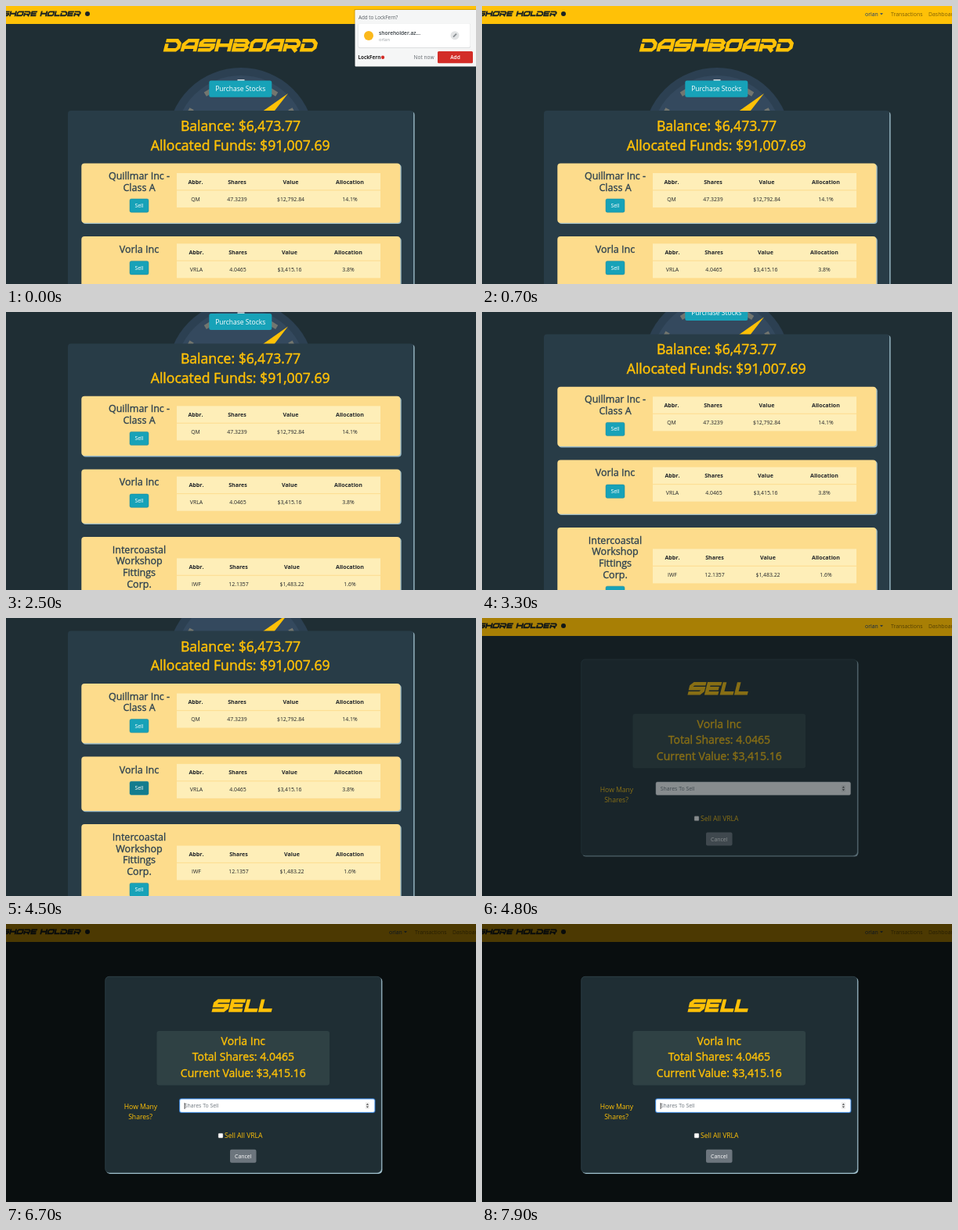
An HTML page for the animation above (8000 ms loop, 600 by 356 pixels).

```html
<!DOCTYPE html>
<html lang="en">
<head>
<meta charset="utf-8">
<title>Stock dashboard</title>
<style>
html, body { margin: 0; width: 100%; height: 100%; overflow: hidden; background: #1f2e34; }
svg { display: block; width: 100%; height: 100%; font-family: "Open Sans", "Noto Sans", sans-serif; }
</style>
</head>
<body>
<svg id="stage" viewBox="0 0 600 356" xmlns="http://www.w3.org/2000/svg"></svg>
<script>
const GOLD = '#ffc107', TEAL = '#17a2b8', PAGE = '#1f2e34', SLATE = '#2c4150', EDGE = '#9dbcc8';
const LOOP = 8000, STEP = 100;

const rect = (x, y, w, h, fill, r = 0, extra = '') =>
  `<rect x="${x}" y="${y}" width="${w}" height="${h}" rx="${r}" fill="${fill}" ${extra}/>`;
const text = (x, y, size, fill, str, { weight = 400, anchor = 'middle', id = '' } = {}) =>
  `<text ${id && `id="${id}"`} x="${x}" y="${y}" font-size="${size}" fill="${fill}" font-weight="${weight}" text-anchor="${anchor}">${str}</text>`;
// A thin outline gives a medium weight.
const heading = (x, y, size, fill, str) =>
  `<g stroke="${fill}" stroke-width="${size * .026}">${text(x, y, size, fill, str)}</g>`;
const raised = (x, y, w, h, fill, r, edge = EDGE) =>
  rect(x + 1.4, y + 1.4, w, h, edge, r) + rect(x, y, w, h, fill, r);

// Display lettering: centre lines on a 16 unit high cell, with the cell width.
const GLYPHS = {
  D: [20, 'M0 2H14L18 6V11L15 14H2V6'],
  A: [20, 'M2 16V7L7 2H18V16M2 10.5H18'],
  S: [20, 'M20 2H5L2 5V8H18V11L15 14H0'],
  H: [20, 'M2 0V16M18 0V16M2 8H18'],
  B: [20, 'M0 2H15L18 5L16 8H4M16 8L18 11L15 14H2V5'],
  O: [20, 'M5 2H18V11L15 14H2V5Z'],
  R: [20, 'M2 16V6M0 2H15L18 5V8L16 10H4M11 10L17 16'],
  E: [18, 'M18 2H2V14H17M2 8H16'],
  L: [16.5, 'M2 0V14H16.5']
};
function lettering(word, x, y, scale, color) {
  let pen = 0;
  const paths = [...word].map(ch => {
    const [width, d] = GLYPHS[ch] || [8, ''];
    const path = `<path transform="translate(${pen})" d="${d}"/>`;
    pen += width + 1.75;
    return path;
  }).join('');
  return `<g role="img" aria-label="${word}" transform="translate(${x} ${y}) scale(${scale}) translate(4) skewX(-14)"
    fill="none" stroke="${color}" stroke-width="4.6">${paths}</g>`;
}

const navbar = () => rect(0, 0, 600, 23, GOLD) +
  lettering('SHORE HOLDER', -5, 6.5, .415, '#1c2424') +
  '<circle cx="104" cy="10" r="3" fill="#1c2424"/>' +
  text(489, 13, 6.9, '#1c3f72', 'orlan', { anchor: 'start' }) +
  '<path d="M508 9.3h4l-2 2z" fill="#1c3f72"/>' +
  text(522, 13, 6.9, '#7d5f06', 'Transactions', { anchor: 'start' }) +
  text(570, 13, 6.9, '#7d5f06', 'Dashboard', { anchor: 'start' });

function gauge() {
  const ticks = [-62, -32, 32, 62].map(a =>
    `<rect x="-7" y="-78" width="14" height="6" fill="#73766f" transform="rotate(${a})"/>`).join('');
  return `<g transform="translate(300 173)">
    <circle r="94" fill="#2c4052"/><circle r="84" fill="#34495e"/>${ticks}
    <rect x="-4.5" y="-79" width="9" height="6" fill="#d5dadc"/>
    <path d="M60 -61L16 -30H36Z" fill="${GOLD}"/></g>`;
}

function sellButton(y, id = '') {
  return rect(158, y, 24, 17.2, TEAL, 2, `${id && `id="${id}"`} stroke="#1d8499" stroke-width=".5"`) +
    text(170, y + 11, 6.9, '#fff', 'Sell');
}

function card({ y, h, lines, first, buttonY, tableY, cols, row, id }) {
  const heads = ['Abbr.', 'Shares', 'Value', 'Allocation'];
  return raised(96.3, y, 407, h, '#fddc8c', 4) +
    lines.map((s, i) => heading(170, first + i * 14.6, 12.5, SLATE, s)).join('') +
    sellButton(buttonY, id) +
    rect(218, tableY, 260, 44, '#feeeb8') + rect(218, tableY + 21.3, 260, 1.2, '#fddf95') +
    cols.map((x, i) => text(x, tableY + 13.5, 7.1, '#212529', heads[i], { weight: 700 }) +
      text(x, tableY + 35.6, 6.9, '#212529', row[i])).join('');
}

const cards = [
  { y: 201.4, h: 76.3, lines: ['Quillmar Inc -', 'Class A'], first: 222, buttonY: 247, tableY: 214,
    cols: [242, 295, 363.5, 439], row: ['QM', '47.3239', '$12,792.84', '14.1%'] },
  { y: 295, h: 69.3, lines: ['Vorla Inc'], first: 316, buttonY: 326.7, tableY: 304.3,
    cols: [243, 296, 362, 437], row: ['VRLA', '4.0465', '$3,415.16', '3.8%'], id: 'hoverSell' },
  { y: 381.5, h: 106, lines: ['Intercoastal', 'Workshop', 'Fittings', 'Corp.'], first: 402.5, buttonY: 456.8, tableY: 409,
    cols: [243, 297, 365, 439], row: ['IWF', '12.1357', '$1,483.22', '1.6%'] }
];

const dashboard = () => `<g id="dashboard">` +
  lettering('DASHBOARD', 201, 42.3, 1, GOLD) + gauge() +
  rect(259.3, 95.5, 80, 21.2, TEAL, 2.5) + text(299.2, 109.2, 8.5, '#fff', 'Purchase Stocks') +
  raised(79, 134, 441.2, 420, '#283c47', 4) +
  heading(299.5, 160, 17.6, GOLD, 'Balance: $6,473.77') +
  heading(299.2, 184.7, 17.6, GOLD, 'Allocated Funds: $91,007.69') +
  cards.map(card).join('') + '</g>';

const start = { anchor: 'start' };
const popup = () => `<g id="popup">` +
  rect(444.5, 4, 156, 74, '#000', 1, 'opacity=".18"') + rect(445.5, 5, 155, 72.5, '#f5f6f6', 1) +
  text(450, 16.7, 6.3, '#555b60', 'Add to LockFern?', start) +
  rect(449.5, 22.5, 143.5, 31.5, '#dcdedf', 2) + rect(450, 22.5, 142.5, 30.5, '#fff', 2) +
  `<circle cx="463" cy="38" r="6" fill="#fbb91c"/>` +
  text(476, 37, 6.6, '#333a3f', 'shoreholder.az...', { anchor: 'start', weight: 600 }) +
  text(476, 44.8, 5.8, '#9a9fa3', 'orlan', start) +
  `<circle cx="573" cy="37.7" r="5.5" fill="#e2e4e5"/>
   <path d="M571 39.7L575 35.7" stroke="#8a9094" stroke-width="1.8"/>` +
  text(449.5, 67.8, 6.3, '#222', 'LockFern', { anchor: 'start', weight: 700 }) +
  `<circle cx="481" cy="65.7" r="2.2" fill="#d32d27"/>` +
  text(533.5, 67.9, 6.6, '#60666b', 'Not now', { id: 'notNow' }) +
  rect(551, 58, 45, 15.3, '#d32d27', 1.5) +
  text(573.5, 68, 6.6, '#fff', 'Add', { weight: 600 }) + '</g>';

const modal = () => `<rect id="backdrop" width="600" height="356"/><g id="modal">` +
  raised(126.5, 67, 352.5, 251.5, PAGE, 5) +
  rect(126.8, 67.3, 352, 251, 'none', 5, 'stroke="#34474f" stroke-width=".6"') +
  lettering('SELL', 262.5, 96.5, 1, GOLD) +
  rect(192.5, 137, 220.5, 69.5, '#2f4144', 3) +
  ['Vorla Inc', 'Total Shares: 4.0465', 'Current Value: $3,415.16']
    .map((s, i) => heading(302.8, 155 + i * 20.4, 14, GOLD, s)).join('') +
  text(172, 237, 8.6, GOLD, 'How Many') + text(171.5, 250.2, 8.6, GOLD, 'Shares?') +
  rect(221, 223.3, 250.5, 18.7, '#2b6fc0', 3, 'id="ring"') +
  rect(222, 224.3, 248.5, 16.7, '#fff', 2, 'id="field" stroke="#ced4da" stroke-width=".5"') +
  text(227.7, 235.4, 6.9, '#6c757d', 'Shares To Sell', start) +
  rect(227.7, 229, .8, 8, '#222', 0, 'id="caret"') +
  rect(458.7, 228.3, 5.4, 8.7, '#eee', 1) +
  '<path d="M459.8 231.8l1.6-2 1.6 2zM459.8 233.6l1.6 2 1.6-2z" fill="#4a4a4a"/>' +
  rect(271, 268, 6, 6, '#fff', 1, 'stroke="#767676" stroke-width=".5"') +
  text(279, 274, 8.6, GOLD, 'Sell All VRLA', start) +
  rect(286, 288.8, 33.5, 17, '#6c757d', 2) + text(302.7, 299.8, 6.9, '#fff', 'Cancel') + '</g>';

document.getElementById('stage').innerHTML = rect(0, 0, 600, 356, PAGE) +
  `<g id="page">${navbar()}${dashboard()}</g>` + popup() + modal();

const el = {};
document.querySelectorAll('[id]').forEach(node => el[node.id] = node);
const set = (node, name, value) => node.setAttribute(name, value);
const clamp = v => Math.max(0, Math.min(1, v));
const mix = (a, b, p) => `rgb(${a.map((v, i) => Math.round(v + (b[i] - v) * p))})`;

const SCROLL = [[2100, 17.2], [2200, 41], [2300, 65], [2400, 84], [2500, 93.6],
  [3300, 105.6], [3400, 113.5], [3500, 117.4], [4700, 0]];
const scrollAt = t => SCROLL.reduce((y, [at, value]) => t >= at ? value : y, 0);

function render(time) {
  const t = Math.floor((time % LOOP) / STEP) * STEP;
  const selling = t >= 4700;

  set(el.page, 'transform', `translate(0 ${-scrollAt(t)})`);
  set(el.dashboard, 'visibility', selling ? 'hidden' : 'visible');

  set(el.popup, 'opacity', t < 600 ? 1 : t < 700 ? .5 : 0);
  set(el.notNow, 'fill', t < 200 ? '#60666b' : '#25292c');
  set(el.hoverSell, 'fill', mix([23, 162, 184], [19, 124, 142], clamp((t - 4100) / 400)));

  const p = clamp((t - 4600) / 700);
  const shown = selling ? 1 - (1 - p) ** 2 : 0;
  set(el.backdrop, 'opacity', .7 * shown);
  set(el.modal, 'opacity', shown);
  set(el.modal, 'transform', `translate(0 ${-28 * (1 - shown)})`);

  const focus = clamp((t - 5500) / 200);
  set(el.ring, 'opacity', focus);
  set(el.field, 'stroke', focus ? '#80bdff' : '#ced4da');
  const caretOn = t >= 5600 && Math.floor((t - 5500) / 600) % 2 === 0;
  set(el.caret, 'opacity', caretOn ? 1 : 0);
}

function tick() {
  render(performance.now());
  requestAnimationFrame(tick);
}
tick();
</script>
</body>
</html>
```
